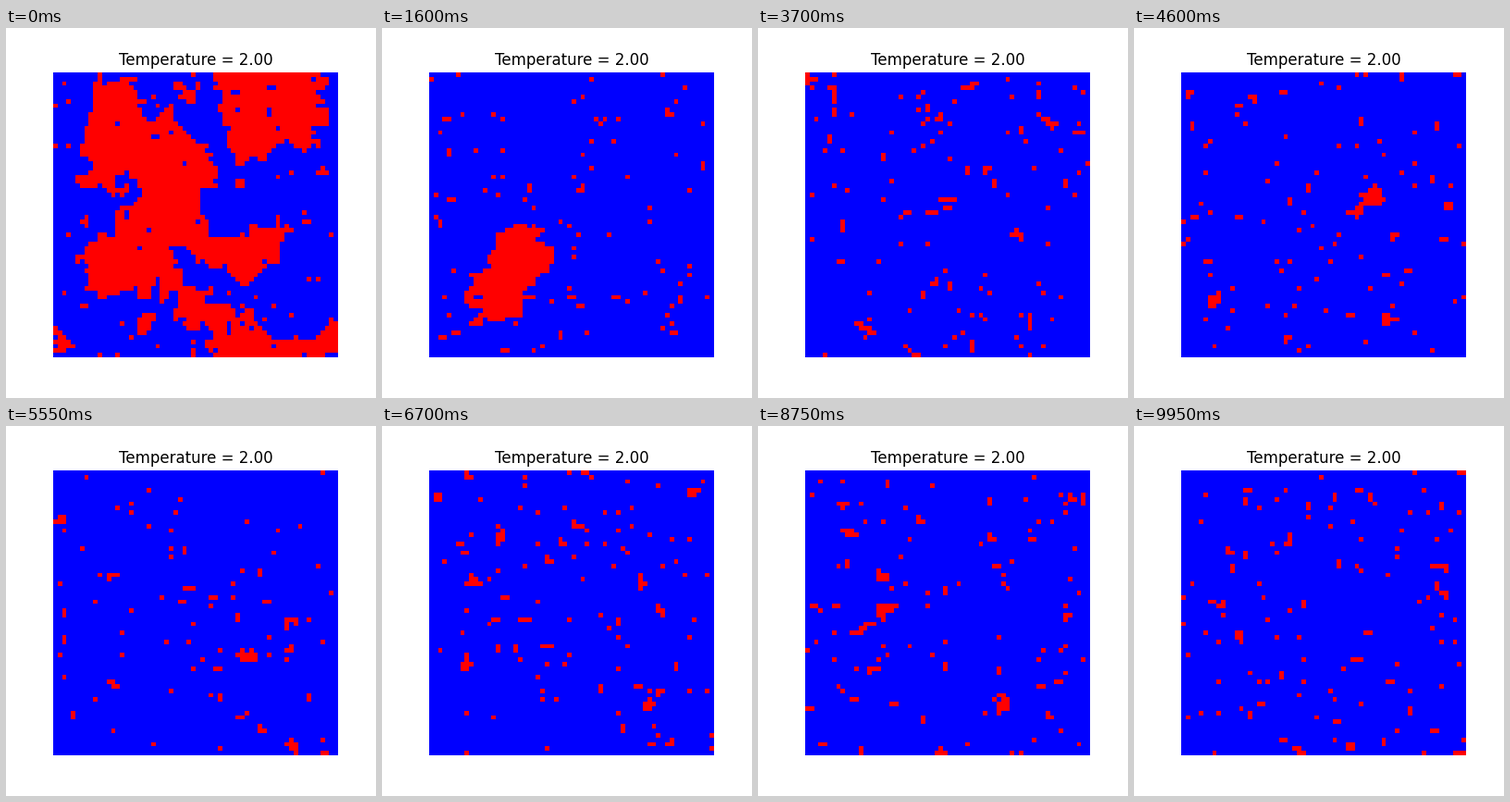
A matplotlib script for the animation above (10000 ms loop, 400x400 px).

```python
import numpy as np
import matplotlib.pyplot as plt
from matplotlib.animation import FuncAnimation
from matplotlib.colors import ListedColormap
from matplotlib.path import Path

N = 64
FRAMES = 200
SWEEPS = 8
TEMP = 2.0
COARSENING = 32  # steps until only one large domain is left

rng = np.random.default_rng(12)
rows, cols = np.mgrid[:N, :N]
centres = np.column_stack([cols.ravel() + 0.5, rows.ravel() + 0.5])
parity = (rows + cols) % 2

# Key points of the starting domains, as (column, row)
LEFT = [
    (9, 4), (14, 1), (19, 2), (20, 5), (18, 9), (22, 9), (24, 12), (27, 9),
    (34, 15), (36, 24), (33, 29), (33, 34), (38, 37), (48, 34), (54, 34),
    (49, 45), (45, 48), (40, 44), (34, 45), (31, 38), (27, 42), (31, 50),
    (24, 50), (23, 45), (21, 50), (17, 48), (9, 51), (7, 38), (12, 37),
    (17, 30), (20, 30), (18, 23), (14, 22), (17, 28), (12, 28), (5, 23),
    (10, 19), (5, 15), (9, 13)]
TOP_RIGHT = [(37, 0), (60, 0), (61, 9), (56, 17), (48, 16), (43, 23), (37, 5)]
BOTTOM = [
    (25, 54), (29, 50), (34, 50), (40, 54), (44, 52), (45, 58), (49, 61),
    (57, 60), (61, 56), (64, 59), (64, 62), (56, 64), (37, 64), (34, 58)]
CORNER = [(0, 59), (4, 63), (3, 64), (0, 64)]
ISLAND = [(18, 53), (22, 53), (22, 59), (19, 57)]
SPOT = [(28, 3), (31, 2), (31, 6), (29, 7)]


def inside(outline):
    return Path(outline).contains_points(centres).reshape(N, N)


def ellipse(x, y, long, short, angle):
    dx, dy = cols + 0.5 - x, rows + 0.5 - y
    c, s = np.cos(angle), np.sin(angle)
    return ((dx * c + dy * s) / long) ** 2 + ((dy * c - dx * s) / short) ** 2 < 1


def sweep(spins, h):
    """One Metropolis sweep on a periodic checkerboard."""
    for colour in (0, 1):
        near = sum(np.roll(spins, d, axis) for d in (-1, 1) for axis in (0, 1))
        cost = 2 * spins * (near + h)
        accept = rng.random((N, N)) < np.exp(-np.maximum(cost, 0) / TEMP)
        spins = np.where(accept & (parity == colour), -spins, spins)
    return spins


def simulate():
    domains = (LEFT, TOP_RIGHT, BOTTOM, CORNER, ISLAND, SPOT)
    up = np.any([inside(outline) for outline in domains], axis=0)
    spins = sweep(np.where(up, 1, -1), 0)  # roughen the edges
    states = [spins]

    # While the domains shrink, the lower left one is favoured
    shrink = np.where(ellipse(18, 45, 11, 6, np.radians(120)), 0.3, -0.1)
    for step in range(1, FRAMES):
        h = shrink if step <= COARSENING else -0.04
        for _ in range(SWEEPS):
            spins = sweep(spins, h)
        states.append(spins)
    return states


states = simulate()

plt.rcParams["font.family"] = "DejaVu Sans"
fig, ax = plt.subplots(figsize=(4, 4), dpi=100)
image = ax.imshow(states[0], cmap=ListedColormap(["#0000ff", "#ff0000"]),
                  vmin=-1, vmax=1, interpolation="nearest")
ax.set_title(f"Temperature = {TEMP:.2f}", fontsize=12)
ax.axis("off")


def update(step):
    image.set_data(states[step])
    return [image]


anim = FuncAnimation(fig, update, frames=FRAMES, interval=50, repeat=True,
                     repeat_delay=0, blit=False)
plt.show()
```
